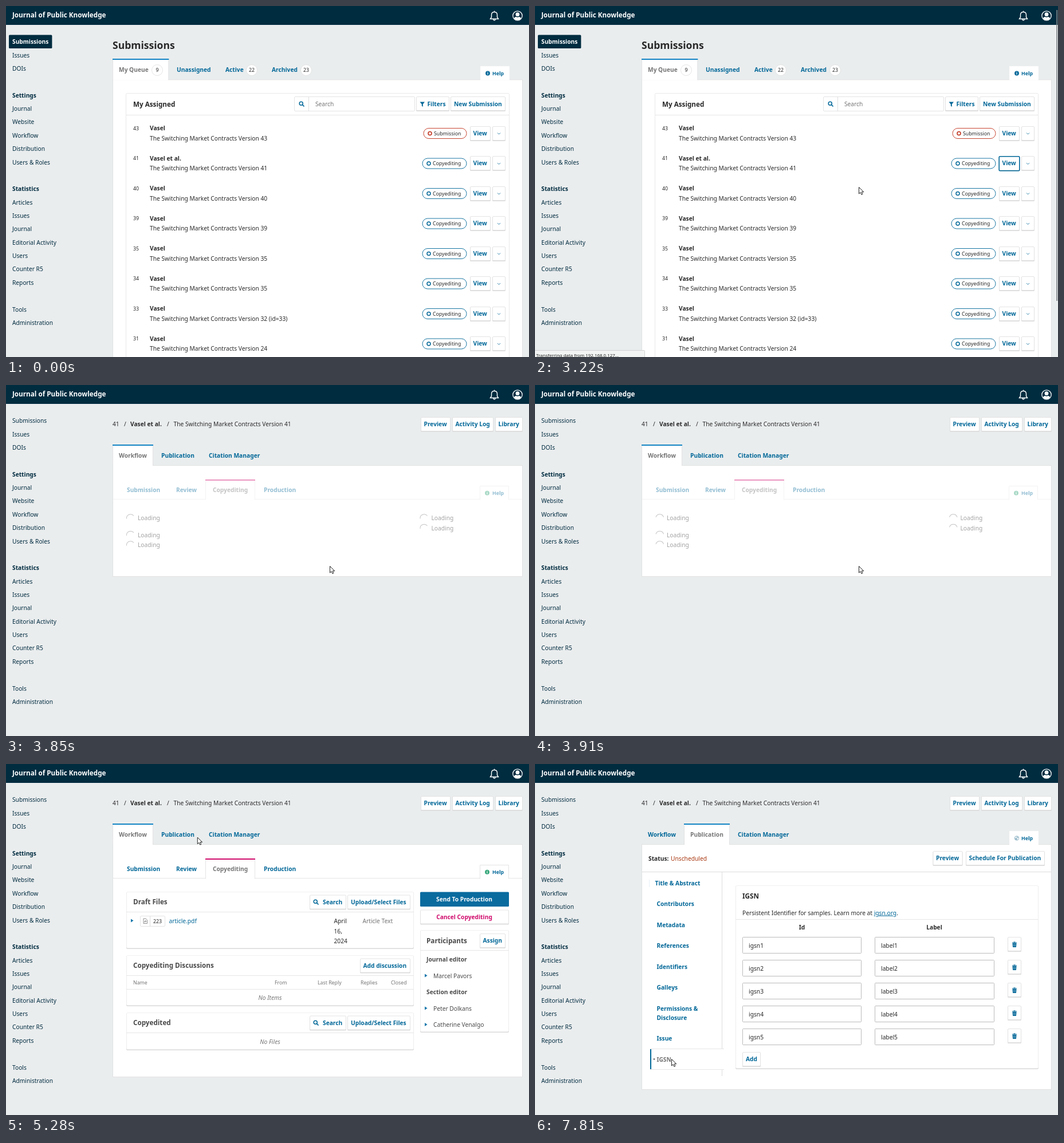
Write an HTML page that moves like this. It is 913x613 px and loops after 8 s.

```html
<!DOCTYPE html>
<html lang="en">
<head>
<meta charset="utf-8">
<title>Submission workflow</title>
<style>
html, body { margin: 0; width: 100%; height: 100%; overflow: hidden; background: #eaedee; }
svg { display: block; }
text { font: 10.23px "Noto Sans", sans-serif; fill: #292929; white-space: pre; }
.b { font-weight: 700; }
.i { font-style: italic; }
.c { text-anchor: middle; }
.h1 { font-size: 17.53px; }
.h2 { font-size: 11.69px; }
.tool { font-size: 13.5px; }
.s { font-size: 8.77px; }
.xs { font-size: 7.9px; }
.grey { fill: #757575; }
.dim { fill: #4a4a4a; }
.link { fill: #006798; }
.navy { fill: #002c40; }
.white { fill: #fff; }
.red { fill: #a83710; }
.pink { fill: #d00a6c; }
</style>
</head>
<body>
<svg id="stage" width="913" height="613" viewBox="0 0 913 613"></svg>
<script>
const BLUE = '#006798', ACCENT = '#1384c4', PINK = '#d00a6c', NAVY = '#002c40', EDGE = '#ddd', INK = '#222f3e';
const AUTHOR = 'Vasel', PAPER = 'The Switching Market Contracts Version ';

// Drawing helpers; text is placed by its left edge and cap-height centre.
const text = (x, y, s, cls = '', attrs = '') => `<text x="${x}" y="${y}" dy=".36em" class="${cls}" ${attrs}>${s}</text>`;
const rect = (x, y, w, h, fill, stroke = 'none', r = 0, sw = .8, attrs = '') =>
  `<rect x="${x}" y="${y}" width="${w}" height="${h}" rx="${r}" fill="${fill}" stroke="${stroke}" stroke-width="${sw}" ${attrs}/>`;
const fill = (x, y, w, h, color, attrs) => rect(x, y, w, h, color, 'none', 0, 0, attrs);
const path = (d, stroke, fill = 'none', sw = 1) =>
  `<path d="${d}" stroke="${stroke}" fill="${fill}" stroke-width="${sw}"/>`;
const circle = (x, y, r, fill, stroke = 'none', sw = 1) =>
  `<circle cx="${x}" cy="${y}" r="${r}" fill="${fill}" stroke="${stroke}" stroke-width="${sw}"/>`;
const group = (id, ...parts) => `<g id="${id}">${parts.join('')}</g>`;
const each = (list, fn) => list.map(fn).join('');
const hline = (x, y, w, c = '#e6e6e6') => fill(x, y, w, 1, c);
const vline = (x, y, h, c = EDGE) => fill(x, y, 1, h, c);

const box = (x, y, w, h) => rect(x, y + 1, w, h, EDGE, 'none', 1.5) + rect(x + .5, y + .5, w - 1, h - 1, '#fff', EDGE, 1.5);
const button = (x, y, w, label, tx, cls = 'b link') => box(x, y, w, 25) + text(tx, y + 12.5, label, cls);
const card = (x, y, w, h) => rect(x, y + 1, w, h, '#d8d8d8', 'none', 2) + rect(x + .5, y + .5, w - 1, h - 1, '#fff', '#eee', 2);
const panel = (y, bottom) => rect(186.5, y + .5, 715, bottom - y, '#fff', EDGE);
const tab = (x, y, w, bottom, color) =>
  path(`M${x + .5} ${bottom}V${y + .5}h${w}V${bottom}`, EDGE, '#fff', .8) + fill(x, y, w + 1, 2, color);
const help = (x, y, icon, stroke = '#fff') =>
  path(`M${x + .5} ${y + 24.5}v-24h50v24`, stroke, '#fff', .8) + icon + text(849, y + 12.5, 'Help', 'b s link');
const info = (x, y, c) => circle(x, y, 3.9, c) + fill(x - .6, y - .6, 1.2, 2.8, '#fff') + fill(x - .6, y - 2.4, 1.2, 1.2, '#fff');
const globe = (x, y, c, r = 7) => circle(x, y, r, c) +
  `<path transform="translate(${x} ${y}) scale(${r / 7})" d="M-5-3l3-2 3 1-1 2-2 1v2l-2-1zM1 0l3-1 2 2-2 3-2 1-1-2zM2-5l3 2-2 1z" fill="#fff"/>`;
const lens = (x, y) => circle(x - .8, y - .8, 3, 'none', BLUE, 1.5) + path(`M${x + 1.5} ${y + 1.5}l3 3`, BLUE, 'none', 1.7);
const arrow = (x, y) => path(`M${x} ${y - 3}l4.5 3-4.5 3z`, 'none', '#1376ab');

const header = fill(0, 0, 913, 33, NAVY) + text(11, 15.5, 'Journal of Public Knowledge', 'b h2 white') +
  path('M845.5 22.5h14l-2-3v-4c0-3-2-5-5-5s-5 2-5 5v4zM852.5 10.5v-2M850.5 23.5q2 3 4 0', '#fff', 'none', 1.4) +
  circle(893, 17, 8.2, 'none', '#fff', 1.3) + circle(893, 14.7, 3.4, '#fff') +
  path('M886.5 21.5q2-3 4-2.5q2.5 1 5 0q2-.5 4 2.5q-6 6.5-13 0z', 'none', '#fff');

const MENU = ['', 'Issues', 'DOIs', '', '*Settings', 'Journal', 'Website', 'Workflow', 'Distribution',
  'Users & Roles', '', '*Statistics', 'Articles', 'Issues', 'Journal', 'Editorial Activity', 'Users', 'Counter R5',
  'Reports', '', 'Tools', 'Administration'];
const menu = each(MENU, (s, i) => text(11, 62.5 + 23.37 * i, s.replace('*', ''), s[0] == '*' ? 'b navy' : 'navy'));

// Submission list
const badge = (x, n) => circle(x, 112, 9.5, '#fff', EDGE, .8) + text(x, 112, n, 's c');
const row = (id, i) => {
  const y = 213.5 + 52.5 * i, m = y + 9, first = !i, x = first ? 729 : 727, c = first ? '#c0301a' : BLUE;
  const version = { 34: 35, 33: '32 (id=33)', 31: 24 }[id] || id;
  const top = Math.floor(m - 12.5);
  return text(222, y, id, 's') + text(251, y, AUTHOR + (id == 41 ? ' et al.' : ''), 'b') +
    text(251, y + 17.5, PAPER + version) +
    rect(x, m - 9, 804 - x, 18, '#fff', c, 9, .9) + circle(x + 11, m, 3, 'none', c, 1.5) +
    text(x + 18, m, first ? 'Submission' : 'Copyediting', 's') +
    button(810, top, 36, 'View', 815.5) + box(849, top, 23, 25) +
    path(`M858 ${m - 1}l2.5 2.5 2.5-2.5`, BLUE, 'none', .8);
};
const list = group('list',
  rect(5, 50.6, 75.4, 23.3, NAVY, 'none', 1.5), text(11, 62.5, 'Submissions', 'b white'),
  text(186, 69, 'Submissions', 'b h1'),
  panel(128.4, 640), tab(186, 92, 97.3, 129.4, ACCENT),
  text(197, 111, 'My Queue', 'b grey'), badge(264, 9),
  text(298, 111, 'Unassigned', 'b link'), text(383, 111, 'Active', 'b link'), badge(429, 22),
  text(464, 111, 'Archived', 'b link'), badge(524, 23),
  help(828, 105, info(841, 117.5, BLUE)),
  rect(209.5, 152.5, 669, 500, '#fff', '#e4e4e4', 2), text(222, 171.5, 'My Assigned', 'b h2'),
  rect(503.5, 158.5, 210, 25, '#fff', EDGE, 1.5), vline(528, 159, 25), lens(516, 171), text(540, 171.5, 'Search', 'grey'),
  button(716, 158, 58, '', 0), text(735.5, 171, 'Filters', 'b link'), path('M722.5 167.5h8.5l-3.2 4v4.5l-2-1.5v-3z', 'none', BLUE),
  button(776, 158, 96, '', 0), text(782, 171, 'New Submission', 'b link'), hline(210, 190, 668),
  each([43, 41, 40, 39, 35, 34, 33, 31], row),
  rect(810.2, 262.7, 35.6, 25, 'none', BLUE, 1.5, 1, 'id="focus"'));

// Pieces common to every view of one submission
const crumbs = group('crumbs',
  text(11, 62.5, 'Submissions', 'navy'),
  text(186, 68.5, '41'), text(206, 68.5, '/'), text(217, 68.5, AUTHOR + ' et al.', 'b'), text(281, 68.5, '/'),
  text(292.5, 68.5, PAPER + 41),
  button(724, 56, 52, 'Preview', 729.5), button(779, 56, 72, 'Activity Log', 784.5), button(854, 56, 48, 'Library', 859.5));
const TABS = [[197, 'Workflow'], [271, 'Publication'], [354, 'Citation Manager']];
const tabs = on => each(TABS, ([x, s], i) => text(x, 123.5, s, i == on ? 'b grey' : 'b link'));

// Workflow view
const SUB = [[211, 'Submission'], [297, 'Review'], [361, 'Copyediting'], [450, 'Production']];
const loader = ([x, y]) => `<g class="spin" data-x="${x + 7.5}" data-y="${y + 1}">${
  path(`M${x + .5} ${y + 1}a7 7 0 0 1 12.5-5`, '#777')}</g>` + text(x + 20, y, 'Loading');
const fileTools = y => button(530, y, 64, 'Search', 553) + lens(541, y + 12.5) + button(596, y, 110, 'Upload/Select Files', 602);
const person = (y, name) => arrow(731, y - .5) + text(746, y, name, 'dim');
const loaded = group('loaded',
  card(210, 223, 502, 99), text(222, 241, 'Draft Files', 'b h2 dim'), fileTools(228.5), hline(210, 258, 502),
  arrow(218, 273.5), rect(234.5, 265.5, 43, 18, '#fff', EDGE, 1.5), vline(251, 266, 18),
  path('M240 270h4l2.5 2.5v6h-6.5zM241.5 276l2-3 1.5 2z', '#777', 'none', .8), text(257, 274.5, '223', 's'),
  text(284.5, 274, 'article.pdf', 'link'), text(572.5, 274, 'April'), text(572.5, 292, '16,'), text(572.5, 309.5, '2024'),
  text(622.5, 274, 'Article Text', 'grey'),
  card(210, 334, 502, 88), text(222, 352, 'Copyediting Discussions', 'b h2 dim'),
  button(618, 339.5, 88, 'Add discussion', 623.5), hline(210, 369, 502),
  each([[222, 'Name'], [469, 'From'], [544, 'Last Reply'], [619, 'Replies'], [672, 'Closed']], ([x, s]) => text(x, 382, s, 's grey')),
  hline(210, 393, 502), text(461, 408.5, 'No Items', 'i c grey'),
  card(210, 434, 502, 65), text(222, 452, 'Copyedited', 'b h2 dim'), fileTools(439.5), hline(210, 469, 502),
  text(461, 485.5, 'No Files', 'i c grey'),
  rect(723, 223.5, 155, 25.5, '#0a6b9f', 'none', 1.5), text(800, 236.5, 'Send To Production', 'b c white'),
  button(723, 254.5, 155, 'Cancel Copyediting', 800, 'b c pink'),
  card(723, 290, 155, 178), text(734, 308.5, 'Participants', 'b h2 dim'), button(827, 296, 45, 'Assign', 832.5), hline(723, 325, 155),
  text(734, 341.5, 'Journal editor', 'b dim'), person(370, 'Marcel Pavors'),
  text(734, 398.5, 'Section editor', 'b dim'), person(427, 'Peter Dolkans'), person(455.5, 'Catherine Venalgo'));
const flow = group('flow',
  group('short', panel(140, 334)), group('tall', panel(140, 546)),
  tab(186, 104, 70, 141, ACCENT), tabs(0),
  group('stagePane',
    hline(187, 199, 714), tab(348, 165, 86, 200.5, PINK),
    each(SUB, ([x, s], i) => text(x, 183.5, s, i == 2 ? 'b grey' : 'b link')),
    help(827, 176, info(840, 188.7, '#35a77a'), EDGE),
    group('loading', each([[210, 232.5], [210, 262], [210, 279.5], [722.5, 232.5], [722.5, 250]], loader)),
    loaded));

// Publication views
const NAV = ['Contributors', 'Metadata', 'References', 'Identifiers', 'Galleys', 'Permissions &', 'Issue', 'IGSN'];
const navY = i => 244.5 + 36.5 * i + (i > 5 ? 16 : 0);
const publication = on => tab(260, 104, 79, 141, ACCENT) + tabs(1) + help(828, 117, globe(841, 129.5, '#9bbccb', 4)) +
  text(198, 165.5, 'Status:', 'b') + text(237, 165.5, 'Unscheduled', 'red') +
  button(694.5, 152, 52, 'Preview', 700) + button(752, 152, 138, 'Schedule For Publication', 757.5) + hline(187, 188, 714, EDGE) +
  vline(326, on ? 189 : 225, on ? 356 : 400) + text(209.5, 208, 'Title & Abstract', on ? 'b link' : 'b grey') +
  each(NAV, (s, i) => text(212.5, navY(i), s, on && i == 7 ? 'b grey' : 'b link')) + text(212.5, 443, 'Disclosure', 'b link');
const field = (x, y, w, icon) => rect(x + .5, y + .5, w, 28, '#fff', '#aaa', 1) +
  (icon ? vline(x + 28, y + 1, 28, '#c4c4c4') + globe(x + 14, y + 14, icon) : '');
const label = (y, s, must) => text(350.5, y, s + (must ? ' <tspan class="pink">*</tspan>' : ''), 'b');
const form = group('form',
  panel(140, 640), publication(false),
  fill(198, 190, 2, 35, BLUE), hline(199, 225, 128),
  text(757.5, 207.5, 'German', 's link'), text(807, 207.5, 'French', 's link'), text(857.5, 207.5, 'English', 'b s grey'),
  hline(327, 225, 519), vline(846, 189, 36),
  label(257, 'Prefix'), text(350.5, 274.5, 'Examples: A, The'), field(350, 286, 102, '#777'),
  label(342.5, 'Title', true), field(350, 353, 527, PINK), text(391, 369.5, PAPER + 41),
  label(409.5, 'Subtitle'), field(350, 420, 527, '#777'),
  label(476.5, 'Abstract', true), rect(350.5, 487.5, 527, 150, '#fff', '#aaa', 1), hline(351, 517, 526, '#c4c4c4'), vline(465, 488, 29),
  text(362, 502.5, 'B', 'b tool'),
  path('M393.5 498h5M391 507.5h5M396.5 498l-3 9.5', INK, 'none', 1.2),
  path('M416 500l6 7.5M422 500l-6 7.5M444 498l6 7.5M450 498l-6 7.5', INK, 'none', 1.5),
  text(423.5, 499, '2', 'b xs'), text(451.5, 505, '2', 'b xs'),
  `<g transform="translate(481 502.5) rotate(-45)">${path('M-1-2.5h-3a2.5 2.5 0 0 0 0 5h3M1-2.5h3a2.5 2.5 0 0 1 0 5h-3M-3 0h6', INK, 'none', 1.3)}</g>`,
  text(371.5, 547.5, PAPER + 41),
  group('tabDot', circle(300, 134, 1.3, '#555')), group('navDot', circle(208, 515.5, 1.4, '#757575')),
  each([4, 5, 6], i => fill(201, navY(i) - 7, 1.5, 14, ACCENT, `class="hover" data-i="${i}"`)),
  fill(201, 498, 1.5, 35, ACCENT, 'id="lastHover"'));

const bin = (x, y) => path(`M${x - 3.5} ${y - 2.5}h7l-.6 7h-5.8zM${x - 4} ${y - 4}h8v1h-8zM${x - 1.5} ${y - 5}h3v1h-3z`, 'none', BLUE) +
  path(`M${x - 1.2} ${y - 1}v4M${x + 1.2} ${y - 1}v4`, '#fff', 'none', .6);
const sample = n => {
  const y = Math.round(302 + 40.1 * (n - 1));
  return field(362, y, 207) + text(373, y + 15.5, 'igsn' + n) + field(593, y, 208) + text(604, y + 15.5, 'label' + n) +
    box(825, y, 24, 25) + bin(837, y + 13.5);
};
const igsn = group('igsn',
  panel(140, 568), publication(true),
  fill(201, 498, 129, 35, '#fff'), hline(201, 497, 129), hline(201, 533, 129), fill(201, 498, 2, 35, BLUE),
  circle(208, 515.5, 1.4, '#757575'), text(212.5, 516, 'IGSN', 'b grey'),
  fill(199, 202, 1, 13, BLUE, 'id="oldBar"'),
  card(350, 212, 529, 320), text(362, 230.5, 'IGSN', 'b h2'),
  text(362, 260, 'Persistent Identifier for samples. Learn more at <tspan class="link" text-decoration="underline">igsn.org</tspan>.'),
  hline(350, 271, 528), text(466, 285, 'Id', 'b c'), text(697, 285, 'Label', 'b c'),
  each([1, 2, 3, 4, 5], sample), button(362, 503, 32, 'Add', 368));

const status = group('status', rect(-.5, 601.5, 192, 13, '#f2f3f3', '#c8cacb', 1), text(2, 610, '', 'xs', 'id="message"'));
const bar = fill(910.3, 7, 1.7, 508, '#7d8386', 'id="bar"');
const pointer = group('pointer', path('M.5.5v11.5l2.7-2.5 1.7 4 2-.9-1.7-3.8h3.6z', '#222', '#fff'));

const stage = document.getElementById('stage');
stage.innerHTML = header + menu + list + crumbs + flow + form + igsn + status + bar + pointer;

const $ = id => document.getElementById(id);
const spins = document.querySelectorAll('.spin'), hovers = document.querySelectorAll('.hover');
const show = (id, on) => $(id).style.display = on ? '' : 'none';
const fade = (el, o) => el.setAttribute('opacity', o);

// Pointer moves: start, end, x, y
const MOVES = [[600, 940, 556, 351], [1240, 2040, 832, 273], [2350, 2950, 565, 316], [4720, 5380, 333, 127],
  [6040, 6240, 285, 471], [6240, 6820, 238, 515]];
const OPEN = 3420, PUBLISH = 5440, SAMPLES = 7620;

function draw() {
  const t = performance.now() % 8000;
  const ramp = (a, b) => Math.min(1, Math.max(0, (t - a) / (b - a)));
  const within = (a, b) => t >= a && t < b;

  let x = 913, y = 420;
  for (const [a, b, tx, ty] of MOVES) {
    const e = 1 - (1 - ramp(a, b)) ** 3;
    x += (tx - x) * e;
    y += (ty - y) * e;
  }
  $('pointer').setAttribute('transform', `translate(${x} ${y})`);
  show('pointer', t >= 600);

  show('list', t < OPEN);
  show('crumbs', t >= OPEN);
  show('flow', within(OPEN, PUBLISH));
  show('form', within(PUBLISH, SAMPLES));
  show('igsn', t >= SAMPLES);

  show('focus', t >= 1750);
  $('focus').setAttribute('stroke-width', t < 2170 ? 1 : 1.6);
  show('status', within(2500, OPEN));
  $('message').textContent = (t < 3140 ? 'Waiting for' : 'Transferring data from') + ' 192.168.0.127...';

  const ready = t >= 4060;
  show('short', !ready);
  show('tall', ready);
  show('loading', !ready);
  show('loaded', ready);
  fade($('stagePane'), .43 + .57 * ramp(3990, 4180));
  const turn = (Math.min(t, 3910) - 3850) * .36;
  spins.forEach(s => s.setAttribute('transform', `rotate(${turn} ${s.dataset.x} ${s.dataset.y})`));

  show('tabDot', t < 7480);
  show('navDot', t >= 7480);
  hovers.forEach(h => fade(h, Math.max(0, 1 - Math.abs(t - 6240 - 90 * (h.dataset.i - 4)) / 100)));
  fade($('lastHover'), ramp(6500, 6700));
  fade($('oldBar'), 1 - .9 * ramp(SAMPLES, 7800));

  show('bar', within(600, OPEN) || within(5550, SAMPLES));
  $('bar').setAttribute('height', t < OPEN ? 508 : 361);
  requestAnimationFrame(draw);
}
draw();
</script>
</body>
</html>
```
